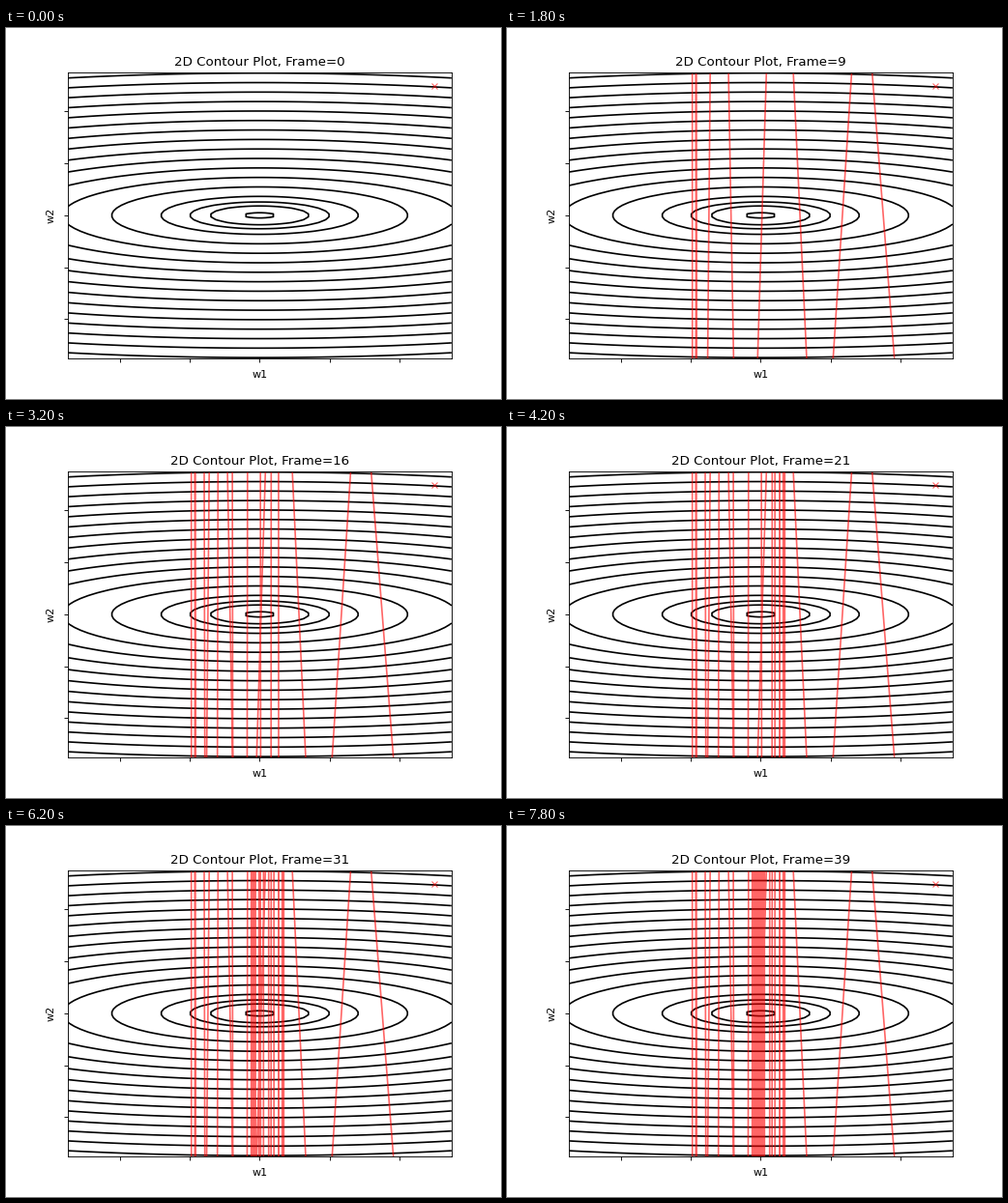
These frames come from a looping animation (512x384 px, 8000 ms). A matplotlib script:

```python
import numpy as np
import matplotlib.pyplot as plt
from matplotlib.animation import FuncAnimation

FRAMES = 40
LIMIT = 2.75
CURVATURE = np.array([1.0, 15.0])
RATE, MOMENTUM = 0.1, 0.9
START = np.array([2.5, 2.5])


def loss(w1, w2):
    return CURVATURE[0] * w1**2 + CURVATURE[1] * w2**2


def lookahead_path(steps):
    """Nesterov descent: the points at which the gradient is taken."""
    w, v = START.copy(), np.zeros(2)
    points = [START]
    for _ in range(steps):
        v = MOMENTUM * v - RATE * CURVATURE * points[-1]
        w = w + v
        points.append(w + MOMENTUM * v)
    return np.array(points)


path = lookahead_path(FRAMES + 1)

fig, ax = plt.subplots(figsize=(6.4, 4.8), dpi=80)

grid = np.linspace(-LIMIT, LIMIT, 100)
w1, w2 = np.meshgrid(grid, grid)
levels = sorted([0.05, 1.0] + [k * k / 2 for k in range(1, 16)])
ax.contour(w1, w2, loss(w1, w2), levels=levels, colors="k", linewidths=1.5)

ax.plot(*START, "rx", alpha=0.6)
trail, = ax.plot([], [], "r-", alpha=0.6)

ticks = range(-2, 3)
ax.set(xlim=(-LIMIT, LIMIT), ylim=(-LIMIT, LIMIT),
       xticks=ticks, yticks=ticks, xticklabels=[], yticklabels=[],
       xlabel="w1", ylabel="w2")
title = ax.set_title("")


def update(frame):
    trail.set_data(path[1:frame + 2, 0], path[1:frame + 2, 1])
    title.set_text(f"2D Contour Plot, Frame={frame}")
    return trail, title


anim = FuncAnimation(fig, update, frames=FRAMES, interval=200,
                     repeat=True, repeat_delay=0, blit=False)
plt.show()
```
